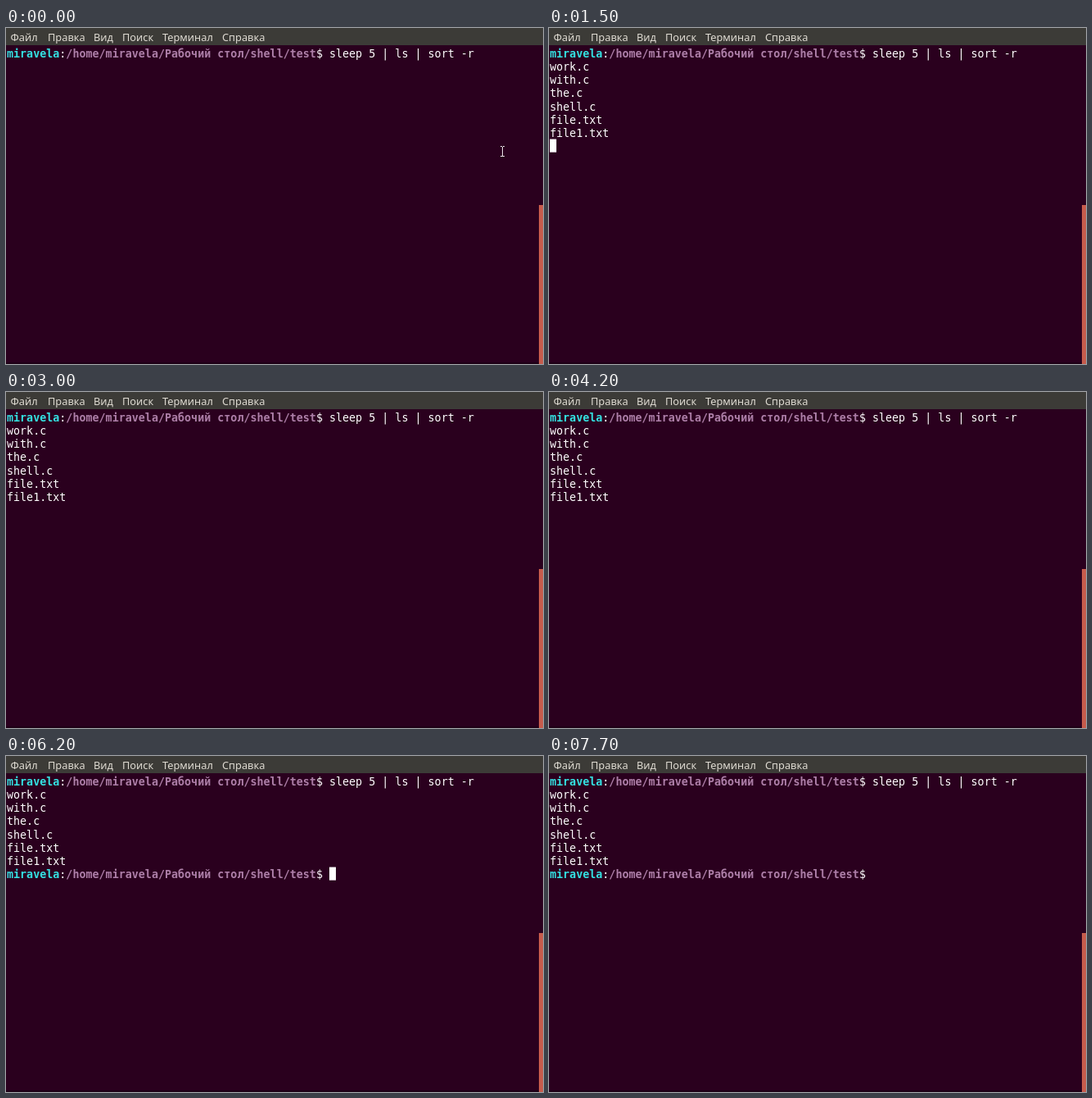
An HTML page with a canvas that plays this animation: 656x410 px, repeating every 8300 ms.

```html
<!DOCTYPE html>
<html lang="ru">
<head>
<meta charset="utf-8">
<title>Терминал</title>
<style>
  html, body { margin: 0; width: 100%; height: 100%; overflow: hidden; background: #2a001e; }
  canvas { display: block; }
</style>
</head>
<body>
<canvas id="stage" width="656" height="410"></canvas>
<script>
const ctx = document.getElementById('stage').getContext('2d');

const LOOP = 8300;
const ENTER = 1200;
const DONE = 6200;
const CELL_W = 8.04, CELL_H = 16.08, LEFT = 1, TOP = 23;

const USER = 'miravela';
const PATH = `/home/${USER}/Рабочий стол/shell/test`;
const COMMAND = 'sleep 5 | ls | sort -r';
const FILES = ['work.c', 'with.c', 'the.c', 'shell.c', 'file.txt', 'file1.txt'];
const MENU = [['Файл', 5.5], ['Правка', 51], ['Вид', 107], ['Поиск', 142], ['Терминал', 191], ['Справка', 264]];

// Moments at which the caret flips, starting hidden.
const BLINKS = [300, 900, 1100, 1700, 2300, 2900, 3500, 4100, 4700, 5300, 5900, 6500, 7000, 7600];

function rect(color, x, y, w, h) {
  ctx.fillStyle = color;
  ctx.fillRect(x, y, w, h);
}

// Writes text on the character grid and returns the next free column.
function write(text, col, row, color = '#ffffff', weight = 'normal') {
  ctx.font = `${weight} 13.35px "DejaVu Sans Mono", monospace`;
  ctx.fillStyle = color;
  for (const char of text) {
    ctx.fillText(char, LEFT + col * CELL_W, TOP + row * CELL_H + 13.2);
    col++;
  }
  return col;
}

function writePrompt(row) {
  let col = write(USER, 0, row, '#34e2e2', 'bold');
  col = write(':', col, row);
  col = write(PATH, col, row, '#ad7fa8', 'bold');
  return write('$ ', col, row);
}

function drawWindow() {
  rect('#2a001e', 0, 0, 656, 410);
  rect('#3c3b37', 0, 0, 656, 21);
  rect('#1e0016', 0, 408, 651, 2);
  rect('#c65b4c', 651, 216, 5, 194);
  ctx.font = '12.8px "Noto Sans", sans-serif';
  ctx.fillStyle = '#dfdbd2';
  for (const [label, x] of MENU) ctx.fillText(label, x, 16);
}

function drawPointer() {
  const color = '#e8e0e6';
  rect(color, 606, 145, 1, 12);
  for (const y of [144, 156]) {
    rect(color, 604, y, 2, 1);
    rect(color, 607, y, 2, 1);
  }
}

function draw(time) {
  drawWindow();
  let row = 0;
  let col = write(COMMAND, writePrompt(0), 0);

  if (time < ENTER) {
    drawPointer();
  } else {
    FILES.forEach((name, i) => write(name, 0, i + 1));
    row = FILES.length + 1;
    col = time < DONE ? 0 : writePrompt(row);
  }

  const flips = BLINKS.filter(moment => moment <= time).length;
  if (flips % 2) rect('#ffffff', LEFT + col * CELL_W, TOP + row * CELL_H, CELL_W, CELL_H);
}

const start = performance.now();
function tick() {
  draw((performance.now() - start) % LOOP);
  requestAnimationFrame(tick);
}
tick();
</script>
</body>
</html>
```
